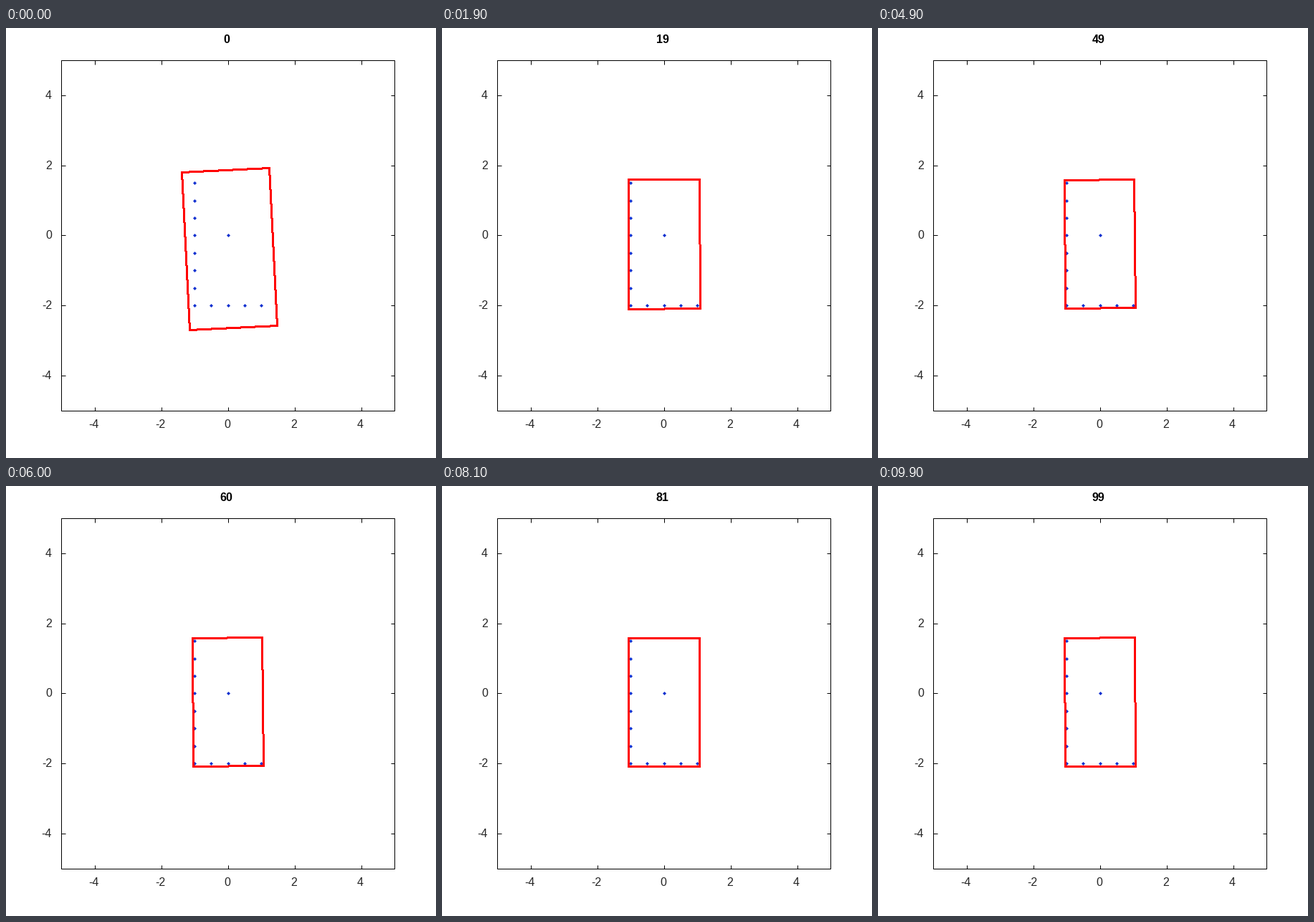
Write a matplotlib script that moves like this. It is 600 px wide and 600 px high and loops after 10 s.

```python
import numpy as np
import matplotlib.pyplot as plt
from matplotlib.animation import FuncAnimation
from matplotlib.patches import Polygon

FRAMES = 100
PX = 0.72  # points per pixel at 100 dpi
TAU = 4.5  # settling time, in frames

plt.rcParams["font.family"] = "Liberation Sans"
fig = plt.figure(figsize=(6, 6), dpi=100, facecolor="white")
ax = fig.add_axes([0, 0, 1, 1])
ax.set(xlim=(0, 600), ylim=(600, 0))
ax.axis("off")


def to_px(x, y):
    """Plot units to a stage pixel."""
    return np.floor(310 + 46.5 * x), np.floor(289.99 - 48.9 * y)


def rule(x, y):
    ax.plot(x, y, color="black", lw=PX, snap=True, solid_capstyle="butt")


def label(x, y, text, **kw):
    return ax.text(x, y, text, fontsize=16 * PX, va="baseline", **kw)


# Axes box, inward ticks and tick labels
L, R, T, B = 77, 542, 45, 534
ax.add_patch(Polygon([(L, T), (R, T), (R, B), (L, B)], fill=False,
                     ec="black", lw=PX, joinstyle="miter", snap=True))
for v in range(-4, 5, 2):
    tx, ty = to_px(v, v)
    for edge, step in ((T, 6), (B, -5)):
        rule([tx, tx], [edge, edge + step])
    for edge, step in ((L, 6), (R, -5)):
        rule([edge, edge + step], [ty, ty])
    label(tx - 1.5, 558, str(v), ha="center", color="#262626")
    label(64, ty + 5, str(v), ha="right", color="#262626")

# Measured points: an L shape and the origin
points = [(-1, y / 2) for y in range(-4, 4)]
points += [(x / 2, -2) for x in range(-1, 3)] + [(0, 0)]
diamond = 2.5 * np.array([(1, 0), (0, 1), (-1, 0), (0, -1)])
for p in points:
    ax.add_patch(Polygon(diamond + to_px(*p) + 0.5, fc="#1230d0",
                         ec="none", snap=False))

# Fitted box: centre x, centre y, width, height, tilt in degrees
START = np.array([311.75, 308.25, 122.2, 220.2, -2.8])
REST = np.array([309.8, 301.4, 99.3, 179.6, 0])
SWAY = np.array([-0.6, -0.4, -2, 0, -0.55])


def corners(n):
    sway = (1 - np.cos(2 * np.pi * (n - 26) / 55)) / 2
    rest = REST + sway * SWAY
    cx, cy, w, h, tilt = rest + (START - rest) * np.exp(-n / TAU)
    c, s = np.cos(np.radians(tilt)), np.sin(np.radians(tilt))
    half = np.array([(-w, -h), (w, -h), (w, h), (-w, h)]) / 2
    return np.round(half @ [(c, s), (-s, c)] + (cx, cy)) + 0.5


# Without antialiasing every touched pixel fills, so 2 px paints 3
box = ax.add_patch(Polygon(corners(0), fill=False, ec="red", lw=2 * PX,
                           antialiased=False, joinstyle="miter",
                           snap=False, zorder=5))
title = label(307.5, 21, "0", ha="center", color="black", weight="bold")


def update(n):
    box.set_xy(corners(n))
    title.set_text(str(n))
    return box, title


anim = FuncAnimation(fig, update, frames=FRAMES, interval=100,
                     repeat=True, repeat_delay=0)
plt.show()
```
